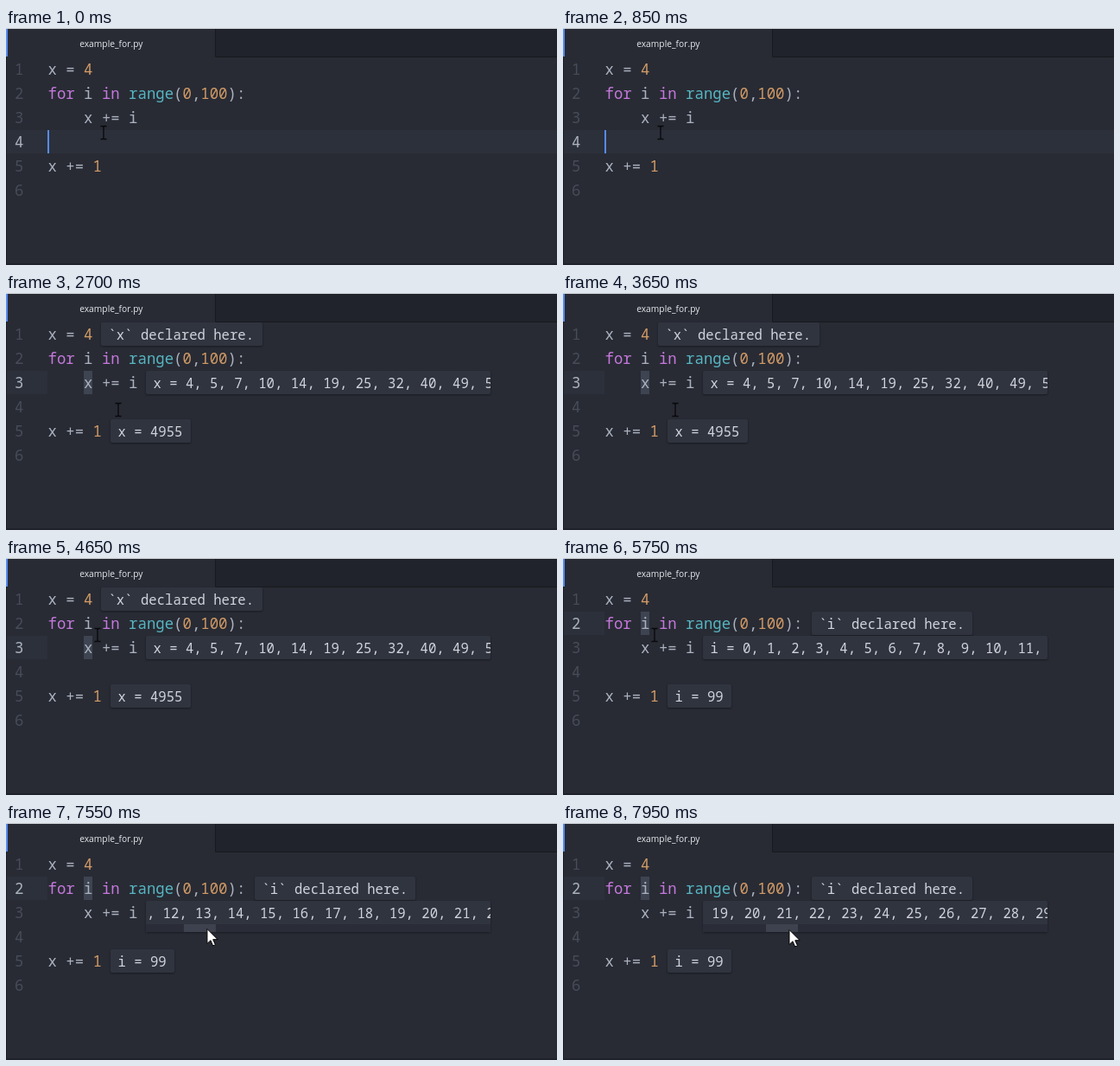
Recreate the animation shown at these times as an HTML page. Size 638 by 274 pixels, loop 8000 ms.

```html
<!DOCTYPE html>
<html lang="en">
<head>
<meta charset="utf-8">
<title>Editor with value bubbles</title>
<style>
  html, body { margin: 0; width: 100%; height: 100%; overflow: hidden; background: #282b34; }
  svg { display: block; }
  text { white-space: pre; }
  .code { font: 500 17.33px "Noto Sans Mono", "DejaVu Sans Mono", monospace; fill: #abb2bf; }
  .note { font: 500 15.62px "Noto Sans Mono", "DejaVu Sans Mono", monospace; fill: #d0d3dc; }
  .tab { font: 500 10.25px "Open Sans", "Noto Sans", sans-serif; fill: #e6e8ed; }
  .num { fill: #d19a66; }
  .key { fill: #c678dd; }
  .fn { fill: #56b6c2; }
  .box { fill: #30343e; filter: drop-shadow(0 1px 1px rgba(0, 0, 0, .4)); }
</style>
</head>
<body>
<svg id="stage" width="638" height="274" viewBox="0 0 638 274">
  <rect width="638" height="274" fill="#282b34"/>
  <rect x="243" width="395" height="34" fill="#20232b"/>
  <path d="M242.5 1V33.5H638" fill="none" stroke="#181a1f"/>
  <rect width="638" height="1" fill="#d4d7dc"/>
  <rect y="33" width="1" height="241" fill="#1b1e24"/>
  <rect y="272" width="638" height="2" fill="#1f2229"/>
  <rect y="1" width="2" height="32" fill="#568af2"/>
  <text class="tab" x="121.8" y="22" text-anchor="middle">example_for.py</text>
  <rect id="gutter" x="1" width="47" height="27" fill="#2c303a"/>
  <rect id="line" x="48" y="118" width="590" height="27" fill="#2c303a"/>
  <rect id="selection" x="90" width="10" height="27" fill="#3e4451"/>
  <g id="numbers" class="code"></g>
  <g class="code">
    <text x="48.5" y="54">x = <tspan class="num">4</tspan></text>
    <text x="48.5" y="82"><tspan class="key">for</tspan> i <tspan class="key">in</tspan> <tspan class="fn">range</tspan>(<tspan class="num">0</tspan>,<tspan class="num">100</tspan>):</text>
    <text x="90.1" y="110">x += i</text>
    <text x="48.5" y="166">x += <tspan class="num">1</tspan></text>
  </g>
  <rect id="caret" x="48" y="118" width="2" height="27" fill="#568af2"/>
  <g id="bubblesX"></g>
  <g id="bubblesI"></g>
  <g id="scrollbar">
    <rect x="162" y="117" width="399" height="9" fill="#2a2d37"/>
    <rect id="thumb" width="37" fill="#3e424e"/>
  </g>
  <path id="beam" d="M-3.5-7.5H-1L0-6.5L1-7.5H3.5M0-6.5V6.5M-3.5 7.5H-1L0 6.5L1 7.5H3.5" fill="none" stroke="#08090b" stroke-width="1.3"/>
  <path id="arrow" d="M0 0V17L4 13.3L6.7 19.5L9.5 18.2L6.8 12.2H12.2Z" fill="#fff" stroke="#000"/>
</svg>
<script>
const LOOP = 8000, SELECT_X = 1600, SELECT_I = 4900, HOVER = 6550, DRAG = 7050;
const SCROLL_RATIO = 9.34;
const NS = "http://www.w3.org/2000/svg";
const el = id => document.getElementById(id);
const set = (node, attrs) => {
  for (const key in attrs) node.setAttribute(key, attrs[key]);
  return node;
};
const show = (node, on) => { node.style.display = on ? "" : "none"; };

function add(parent, tag, attrs, text) {
  const node = set(document.createElementNS(NS, tag), attrs);
  if (text !== undefined) node.textContent = text;
  return parent.appendChild(node);
}

function bubble(parent, x, row, width, text) {
  const y = 34 + 28 * (row - 1);
  const box = add(parent, "rect", { class: "box", x, y, width, height: 27, rx: 2 });
  const view = add(parent, "svg", { x, y, width, height: 27, overflow: "hidden" });
  const label = add(view, "text", { class: "note", x: 8.5, y: 20 }, text);
  return { box, label };
}

const count = Array.from({ length: 100 }, (_, i) => i);
let total = 4;
const sums = count.map(i => total += i);

const bubblesX = el("bubblesX"), bubblesI = el("bubblesI");
bubble(bubblesX, 110, 1, 187, "`x` declared here.");
bubble(bubblesX, 162, 3, 399, "x = " + sums.join(", ") + ",");
bubble(bubblesX, 121, 5, 93, "x = 4955");
bubble(bubblesI, 288, 2, 186, "`i` declared here.");
const list = bubble(bubblesI, 162, 3, 399, "i = " + count.join(", ") + ",");
bubble(bubblesI, 121, 5, 74, "i = 99");

const numbers = [1, 2, 3, 4, 5, 6].map(n =>
  add(el("numbers"), "text", { x: 10, y: 26 + 28 * n }, n));

// Pointer path: time, x, y
const path = [
  [0, 113, 121], [850, 113, 121], [1450, 105, 113], [2350, 105, 113],
  [2700, 130, 135], [3700, 130, 135], [4500, 106, 89], [5750, 106, 89],
  [6600, 181, 119], [6850, 181, 119], [DRAG, 192, 121], [7950, 262, 123.5], [LOOP, 262, 123.5]
];

function pointer(t) {
  const i = path.findIndex(p => p[0] > t);
  const [t0, x0, y0] = path[i - 1], [t1, x1, y1] = path[i];
  const k = (t - t0) / (t1 - t0);
  const ease = k * k * (3 - 2 * k);
  return [x0 + (x1 - x0) * ease, y0 + (y1 - y0) * ease];
}

function draw(t) {
  const typing = t < SELECT_X, onI = t >= SELECT_I;
  const hover = t >= HOVER, drag = t >= DRAG;
  const row = typing ? 4 : onI ? 2 : 3;
  const top = 34 + 28 * (row - 1);

  numbers.forEach((node, i) => { node.style.fill = i + 1 === row ? "#abb2bf" : "#474c58"; });
  set(el("gutter"), { y: top });
  set(el("selection"), { y: top });
  show(el("selection"), !typing);
  show(el("line"), typing);
  show(el("caret"), typing && t % 800 < 400);
  show(bubblesX, !typing && !onI);
  show(bubblesI, onI);

  const [x, y] = pointer(t);
  const shift = drag ? x - 192 : 0;
  set(list.box, { height: hover ? 36 : 27 });
  set(list.label, { x: 8.5 - shift * SCROLL_RATIO });
  show(el("scrollbar"), hover);
  set(el("thumb"), { x: 165 + shift, y: drag ? 117 : 121, height: drag ? 9 : 4, rx: drag ? 0 : 2 });

  show(el("beam"), !hover);
  show(el("arrow"), hover);
  set(el(hover ? "arrow" : "beam"), { transform: `translate(${x} ${y})` });
}

const start = performance.now();
function tick() {
  draw((performance.now() - start) % LOOP);
  requestAnimationFrame(tick);
}
draw(0);
requestAnimationFrame(tick);
</script>
</body>
</html>
```
